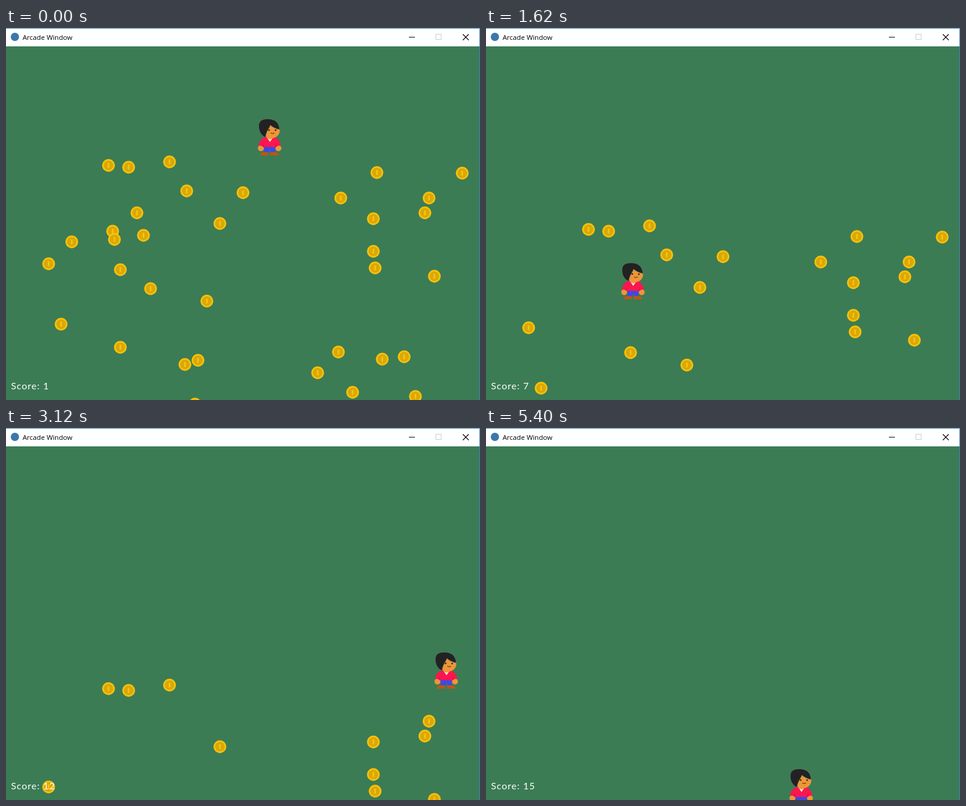
An HTML page that plays this animation: 800x628 px, repeating every 5.8 s.

```html
<!DOCTYPE html>
<html lang="en">
<head>
<meta charset="utf-8">
<title>Arcade Window</title>
<style>
  html, body { margin: 0; width: 100%; height: 100%; overflow: hidden; background: #3b7c55; }
  svg { display: block; width: 800px; height: 628px; }
  .title { font: 11.6px "Open Sans", "Noto Sans", sans-serif; fill: #000; }
  .score { font: 16px Lato, sans-serif; letter-spacing: 1px; fill: #fff; }
</style>
</head>
<body>
<svg viewBox="0 0 800 628">
  <defs>
    <g id="coin">
      <circle r="10.700" fill="#fdc208"/>
      <circle r="8" fill="#d9a808"/>
      <rect x="-1.400" y="-4.200" width="2.800" height="8.400" rx=".6" fill="#fdc208"/>
    </g>
  </defs>

  <rect width="800" height="628" fill="#3b7c55"/>
  <g id="coins"></g>

  <g id="player">
    <!-- legs and shoes -->
    <path d="M-10 46H10L9 57H2L.5 51-1 57H-9Z" fill="#3d48ea"/>
    <path d="M-16 62C-16 58-12 56.500-8 56.500H-2V62ZM15.500 62C15.500 58 12 56.500 8 56.500H1.500V62Z" fill="#c1560f"/>
    <!-- hands and shirt -->
    <circle cx="-14.800" cy="50" r="5" fill="#ee9538"/>
    <circle cx="14.800" cy="50" r="5" fill="#ee9538"/>
    <path d="M-7 31C-14 32-17.500 39-19 46-16 45-13 46-11 48H11C13 46 16 45 19 46 17.500 39 14 32 7 31Z" fill="#fb1650"/>
    <path d="M-11.500 42-10.500 48M11.500 42 10.500 48" stroke="#c9103d" stroke-width=".8"/>
    <path d="M-4.500 32H5.500L.5 39.500Z" fill="#f6e6d2"/>
    <!-- head -->
    <path d="M-7 14C-2 6 14 8 17 17 18 26 13 32 5 33L1 35C-4 34-8 30-8 24Z" fill="#ee9538"/>
    <path d="M-18.500 14C-19 4-13 .5-4 .5 8 0 16 6 17 18.500 11 17.500 5 14.500 1 11 0 16-6 21-7 31.500-14 29-18 22-18.500 14Z"
          fill="#222" stroke="#5f7d6e" stroke-width=".7"/>
    <circle cx="-1" cy="19.300" r="1.400" fill="#3a2412"/>
    <circle cx="10" cy="19.600" r="1.400" fill="#3a2412"/>
    <path d="M2 24Q5 26.500 8 24" fill="none" stroke="#6b3710" stroke-width="1.200"/>
  </g>

  <text id="score" class="score" x="8.400" y="610"></text>

  <!-- title bar and window edge -->
  <rect width="800" height="31" fill="#fff"/>
  <path d="M0 .5H799.500V628" fill="none" stroke="#3f85bf"/>
  <circle cx="15" cy="15" r="7" fill="#3b77a8"/>
  <text class="title" x="28" y="20">Arcade Window</text>
  <g fill="none" stroke="#000">
    <path d="M680 15.500H690"/>
    <rect x="725.500" y="10.500" width="9" height="9" stroke="#ccc"/>
    <path d="M771 10.500 781 20.500M781 10.500 771 20.500" stroke-width="1.100"/>
  </g>
</svg>

<script>
const TICK = 30, LOOP = 5800, LAST = 180, FALL = 2;
const REACH_X = 28, REACH_Y = 42, HALF_HEIGHT = 31;
const $ = id => document.getElementById(id);

// Turning points of the walk: tick, centre x, top y
const walk = [
  [0, 445, 153], [20, 462, 300], [36, 373, 434], [46, 135, 430], [62, 395, 350],
  [72, 454, 321], [80, 590, 384], [90, 744, 353], [95, 780, 337], [101, 780, 367],
  [118, 224, 414], [128, 86, 420], [140, 154, 418], [160, 154, 418], [LAST, 532, 575]
];

const slope = (i, k) => (walk[i + 1][k] - walk[i][k]) / (walk[i + 1][0] - walk[i][0]);

// Monotone tangent: flat where the walk turns, so it never overshoots
function tangent(i, k) {
  if (i === 0) return slope(0, k);
  if (i === walk.length - 1) return 0;
  const a = slope(i - 1, k), b = slope(i, k);
  return a * b > 0 ? 2 * a * b / (a + b) : 0;
}

function along(n, k) {
  const next = walk.findIndex(p => p[0] > n);
  const i = (next < 0 ? walk.length : Math.max(next, 1)) - 1;
  if (i === walk.length - 1) return walk[i][k];
  const p = walk[i], q = walk[i + 1];
  const h = q[0] - p[0], u = (n - p[0]) / h, v = 1 - u;
  return Math.round(
    v * v * (1 + 2 * u) * p[k] + u * u * (1 + 2 * v) * q[k] +
    h * u * v * (v * tangent(i, k) - u * tangent(i + 1, k)));
}

const steps = Array.from({ length: LAST + 1 }, (_, n) => ({ x: along(n, 1), y: along(n, 2) }));

// A coin is picked up on the first tick the player touches it
const firstTouch = (x, y) => steps.findIndex((p, n) =>
  Math.abs(p.x - x) <= REACH_X &&
  Math.abs(p.y + HALF_HEIGHT - y - FALL * n) <= REACH_Y);

const coins = [
  [173, 232], [207, 235], [276, 226], [305, 275], [400, 278], [221, 312], [361, 330],
  [180, 343], [183, 357], [232, 350], [111, 361], [72, 398], [193, 408], [244, 440],
  [339, 461], [93, 500], [193, 539], [302, 568], [324, 561], [319, 635], [626, 244],
  [770, 245], [565, 287], [714, 287], [707, 312], [620, 322], [620, 377], [623, 405],
  [723, 419], [561, 547], [635, 559], [672, 555], [526, 582], [585, 615], [691, 622]
].map(([x, y]) => {
  const el = document.createElementNS("http://www.w3.org/2000/svg", "use");
  el.setAttribute("href", "#coin");
  $("coins").append(el);
  return { x, y, el, touch: firstTouch(x, y) };
});

const place = (el, x, y) => el.setAttribute("transform", `translate(${x} ${y})`);

function draw(ms) {
  const n = Math.min(LAST, Math.floor((ms % LOOP) / TICK));
  let score = 1;
  for (const c of coins) {
    const taken = c.touch >= 0 && n >= c.touch;
    if (taken) score++;
    c.el.setAttribute("visibility", taken ? "hidden" : "visible");
    place(c.el, c.x, c.y + FALL * n);
  }
  place($("player"), steps[n].x, steps[n].y);
  $("score").textContent = "Score: " + score;
}

let start;
function loop(now) {
  start ??= now;
  draw(Math.max(0, now - start));
  requestAnimationFrame(loop);
}
draw(0);
requestAnimationFrame(loop);
</script>
</body>
</html>
```
